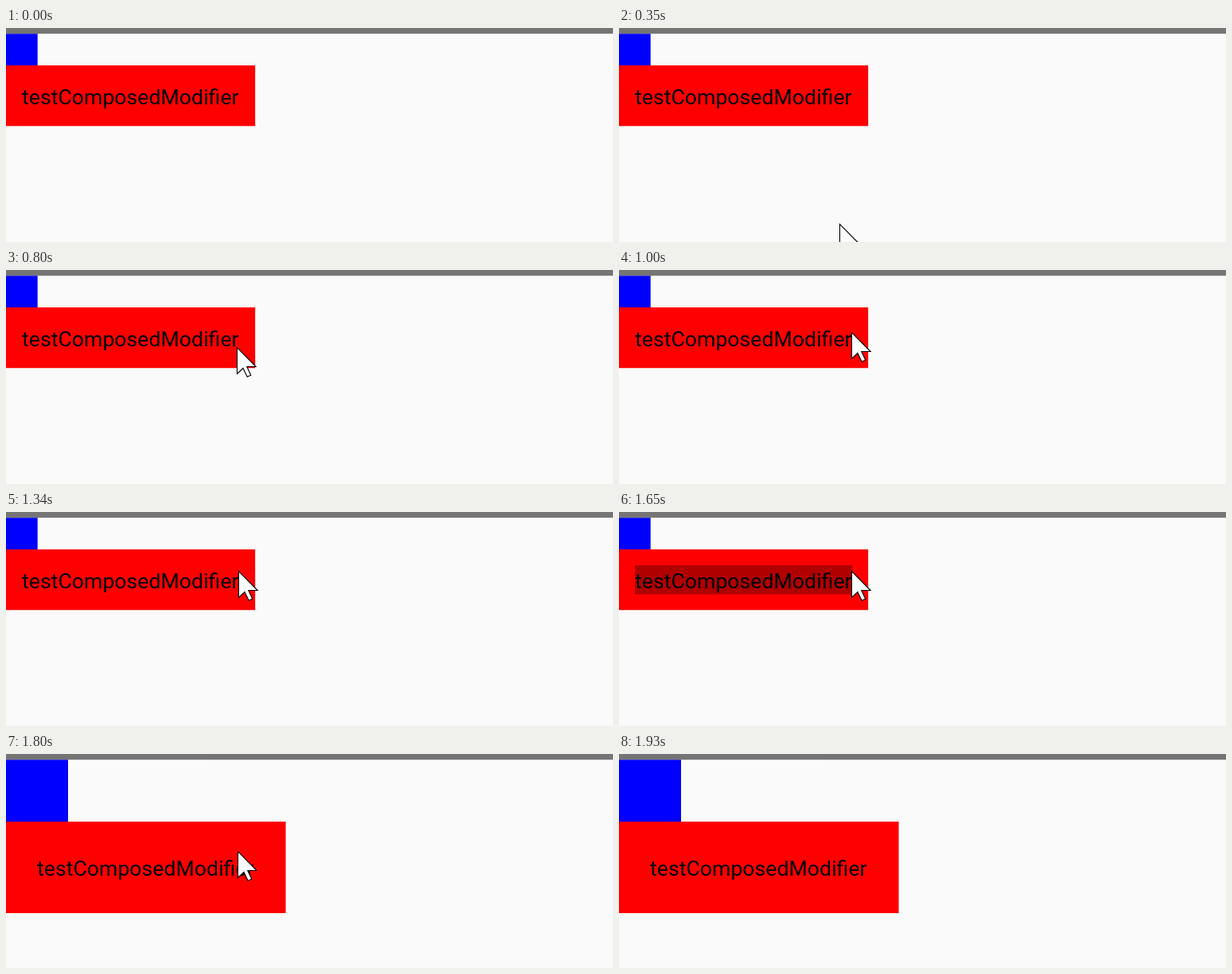
An HTML page for the animation above (2800 ms loop, 763 by 269 pixels).

```html
<!DOCTYPE html>
<html lang="en">
<head>
<meta charset="utf-8">
<title>Composed modifier</title>
<style>
  html, body { margin: 0; width: 100%; height: 100%; overflow: hidden; background: #fafafa; }
  svg { display: block; width: 763px; height: 269px; }
  text { font: 26.7px Roboto, sans-serif; }
  .small, .press, .large, .cursor { animation: 2800ms step-end infinite; }
  .small { animation-name: small; }
  .press { animation-name: press; }
  .large { animation-name: large; }
  .cursor { animation-name: visit, travel; }

  /* 1650 ms press, 1700 ms new layout */
  @keyframes small { 0% { visibility: visible } 60.7%, 100% { visibility: hidden } }
  @keyframes large { 0% { visibility: hidden } 60.7%, 100% { visibility: visible } }
  @keyframes press { 0% { visibility: hidden } 58.92% { visibility: visible } 60.7%, 100% { visibility: hidden } }
  @keyframes visit { 0% { visibility: hidden } 12.5% { visibility: visible } 68.92%, 100% { visibility: hidden } }

  @keyframes travel {
    0%, 12.5% { transform: translate(277px, 246px) }
    14.28% { transform: translate(283px, 212px) }
    15.71% { transform: translate(287px, 178px) }
    17.5%  { transform: translate(288px, 154px) }
    18.92% { transform: translate(288px, 137px) }
    20.35% { transform: translate(288px, 125px) }
    22.14% { transform: translate(288px, 117px) }
    23.57% { transform: translate(288px, 110px) }
    25.35% { transform: translate(289px, 104px) }
    26.78% { transform: translate(289px, 100px) }
    28.57% { transform: translate(290px, 97px) }
    30.35% { transform: translate(290px, 94px) }
    32.14% { transform: translate(291px, 87px) }
    33.92% { transform: translate(292px, 82px) }
    35.71% { transform: translate(292px, 78px) }
    37.14% { transform: translate(292px, 77px) }
    38.92% { transform: translate(292px, 76px) }
    42.14% { transform: translate(292px, 75px) }
    47.85% { transform: translate(292px, 74px) }
    60.7%  { transform: translate(292px, 75px) }
    62.5%  { transform: translate(292px, 90px) }
    64.28% { transform: translate(291px, 122px) }
    65.71% { transform: translate(289px, 168px) }
    67.14%, 100% { transform: translate(285px, 221px) }
  }
</style>
</head>
<body>
<svg viewBox="0 0 763 269">
  <rect width="763" height="269" fill="#fafafa"/>
  <rect width="763" height="7.2" fill="#757575"/>
  <g class="small">
    <path fill="#00f" d="M0 7.2H39.7V47H0Z"/>
    <path fill="#f00" d="M0 47H313.2V123.3H0Z"/>
    <rect class="press" x="20" y="67" width="273.5" height="36.5" fill="#b00000"/>
    <text x="20" y="96">testComposedModifier</text>
  </g>
  <g class="large">
    <path fill="#00f" d="M0 7.2H78V85H0Z"/>
    <path fill="#f00" d="M0 85H351.6V200H0Z"/>
    <text x="39" y="153">testComposedModifier</text>
  </g>
  <path class="cursor" d="M.5 .5V33.5L8 26.5L13.2 37.3L17.8 35.3L12.8 24.5H24.2Z" fill="#fff" stroke="#000" stroke-width="1.1"/>
</svg>
</body>
</html>
```
